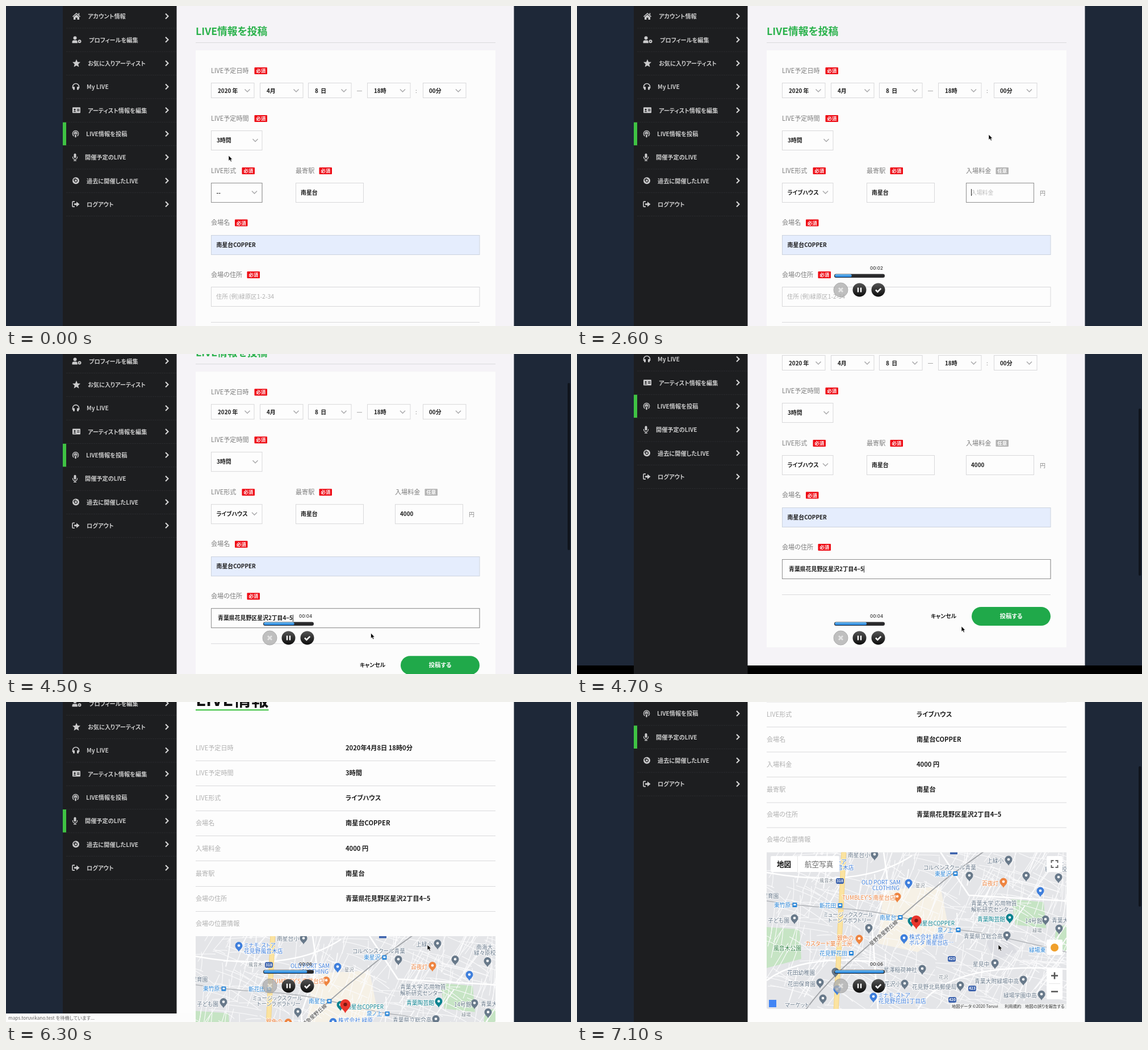
These frames come from a looping animation (995x563 px, 7.2 s). An HTML page:

```html
<!DOCTYPE html>
<html lang="ja">
<head>
<meta charset="utf-8">
<title>LIVE情報を投稿</title>
<style>
html, body { margin: 0; width: 100%; height: 100%; overflow: hidden; background: #1e2838; }
svg { display: block; font-family: "Noto Sans CJK JP", "Noto Sans CJK", sans-serif; font-weight: 500; font-feature-settings: "palt"; }
text { white-space: pre; }
.latin { font-family: Inter, "Noto Sans CJK JP", sans-serif; }
.halo text { paint-order: stroke; stroke: #fff; stroke-width: 2px; stroke-opacity: .8; }
</style>
</head>
<body>
<svg id="stage" width="995" height="563" viewBox="0 0 995 563"></svg>
<script>
const LOOP = 7200, SWITCH = 6200, CHOSEN = 1100, PASTED = 4300;
const VENUE = '南星台COPPER', STATION = '南星台', ADDRESS = '青葉県花見野区星沢2丁目4−5';
const BOLD = 'font-weight="700"', MIDDLE = ' text-anchor="middle"';

// Drawing helpers; text is placed by its vertical centre.
const box = (x, y, w, h, fill, stroke = 'none', r = 0) =>
  `<rect x="${x}" y="${y}" width="${w}" height="${h}" rx="${r}" fill="${fill}" stroke="${stroke}"/>`;
const text = (x, y, s, size = 10, fill = '#222', extra = '') =>
  `<text x="${x}" y="${y + size * .37}" font-size="${size}" fill="${fill}" ${extra}>${s}</text>`;
const line = (d, stroke, w = 1, extra = '') =>
  `<path d="${d}" fill="none" stroke="${stroke}" stroke-width="${w}" ${extra}/>`;
const shape = (d, fill) => `<path d="${d}" fill="${fill}"/>`;
const dot = (x, y, r, fill, stroke = 'none', w = 1) =>
  `<circle cx="${x}" cy="${y}" r="${r}" fill="${fill}" stroke="${stroke}" stroke-width="${w}"/>`;
const at = (x, y, s, extra = '') => `<g transform="translate(${x} ${y}) ${extra}">${s}</g>`;
const during = (from, to, s) => `<g data-from="${from}" data-to="${to}">${s}</g>`;
const rule = (x, y, w, fill = '#dadadc') => box(x, Math.round(y), w, 1, fill);

// Sidebar
const INK = '#cbcbcc', SIDE = '#1d1e20';
const icons = [
  shape('M-7 .3 0-6 7 .3 6 1.4 0-4-6 1.4zM-5 1.6 0-2.8 5 1.6V6H1.5V2.5h-3V6H-5zM3.5-5.5h1.8v3H3.5z', INK),
  dot(-3, -3, 3, INK) + shape('M-8 6V4q0-3 3-3h4q2 0 2 2L1.5 6z', INK) + dot(5, 3, 2, 'none', INK, 2),
  shape('M0-7 2-2.2 7-1.8 3.2 1.6 4.4 6.6 0 4-4.4 6.6-3.2 1.6-7-1.8-2-2.2z', INK),
  line('M-5.5 3V0a5.5 5.5 0 0 1 11 0V3', INK, 1.6) + box(-5, 0, 3, 5.5, INK, 'none', 1) + box(2, 0, 3, 5.5, INK, 'none', 1),
  box(-7, -5, 14, 10, INK, 'none', 1) + dot(-3, -1, 1.5, SIDE) + shape('M-5.5 3q2.5-3.5 5 0z', SIDE) + line('M1-1.5h4.5M1 1h4.5', SIDE, 1.2),
  line('M-3 4.2a5.2 5.2 0 1 1 6 0M-2 1.5a2.6 2.6 0 1 1 4 0', INK, 1.3) + dot(0, -.5, 1.3, INK) + box(-1.2, 1.5, 2.4, 5, INK, 'none', 1),
  box(-2, -6.5, 4, 8, INK, 'none', 2) + line('M-4-1v1a4 4 0 0 0 8 0v-1M0 4v2.5M-2.5 6.2h5', INK, 1.2),
  dot(0, 0, 6, INK) + dot(0, 0, 2.5, 'none', SIDE, 1.2) + line('M-4 0a4 4 0 0 1 4-4', SIDE),
  line('M-2-4.5h-3q-1 0-1 1v7q0 1 1 1h3', INK, 1.6) + shape('M-3-1.5H1v-3L6.5 0 1 4.5v-3h-4z', INK)
];
const items = [['アカウント情報', 124, 144], ['プロフィールを編集', 124.5, 146], ['お気に入りアーティスト', 124, 144],
  ['My LIVE', 123, 142], ['アーティスト情報を編集', 124, 144], ['LIVE情報を投稿', 122.5, 141],
  ['開催予定のLIVE', 121.5, 139], ['過去に開催したLIVE', 123, 142], ['ログアウト', 123, 142]];
const rowY = i => 18.5 + i * 41.33;
const active = i => box(100, rowY(i) - 20.5, 6, 40.5, '#3fc343');
const sidebar = box(100, -60, 200.5, 1400, SIDE) + items.map(([name, ix, tx], i) =>
  at(ix, rowY(i) - .5, icons[i]) + text(tx, rowY(i), name, 10.2, '#c9c9c9', BOLD) +
  line(`M281 ${rowY(i) - 5}l4.5 4.5-4.5 4.5`, '#d6d6d6', 2.1) +
  line(`M106 ${rowY(i) + 20.5}H300`, '#292a2d', 1, 'stroke-dasharray="3 1"')).join('') +
  during(0, SWITCH, active(5)) + during(SWITCH, LOOP, active(6));

// Form page
const badge = (x, y, optional) => box(x, y - 6, 22.5, 12, optional ? '#b3b3b3' : '#ee0a14', 'none', 1) +
  text(x + 11.2, y, optional ? '任意' : '必須', 8.5, '#fff', BOLD + MIDDLE);
const label = (x, y, s, bx, optional) => text(x, y, s, 11.1, '#7d7d7d') + badge(bx, y + .5, optional);
const field = (x, y, w, h = 34, fill = '#fdfdfd', stroke = '#d8d8da') => box(x + .5, y + .5, w - 1, h, fill, stroke);
const focus = (from, to, x, y, w) => during(from, to, field(x, y, w, 34, 'none', '#8f8f8f'));
const arrow = (x, y) => line(`M${x - 4.5} ${y - 2.5}l4.5 4.5 4.5-4.5`, '#a9a9ab', 1.5);
const value = (x, y, s, extra = '') => text(x, y, s, 9.9, '#1c1c1c', BOLD + extra);
const select = (x, tx, s, ax) => field(x, 135, 76.5, 26) + value(tx, 149, s) + arrow(ax, 149);
const submit = fill => box(695, 578, 139, 33, fill, 'none', 16.5);

const form = box(300, -60, 594.5, 741, '#f5f3f7') + box(334, 78, 528, 571, '#fcfcfc') +
  text(334, 44, 'LIVE情報を投稿', 17.8, '#2bb24c', BOLD) + rule(334, 64, 528) +
  label(361, 113.5, 'LIVE予定日時', 437.5) +
  select(361, 373, '2020 年', 425) + select(447, 459, '4月', 511) + select(532, 544, '8  日', 595) +
  rule(618, 149, 9, '#aaa') + select(636, 648, '18時', 698.5) + text(721, 149, ':', 10, '#888') + select(734, 745, '00分', 796.5) +
  label(361, 197.5, 'LIVE予定時間', 437.5) + field(361, 219, 90.5) + value(371, 236.5, '3時間') + arrow(439, 236.5) +
  label(361, 289.5, 'LIVE形式', 415.5) + field(361, 311, 90.5) + arrow(437.5, 328) + focus(0, 2000, 361, 311, 90.5) +
  during(0, CHOSEN, value(370.5, 328, '--')) + during(CHOSEN, LOOP, value(370.5, 328, 'ライブハウス')) +
  label(510, 289.5, '最寄駅', 551.5) + field(510, 311, 120) + value(519, 328, STATION) +
  during(CHOSEN, LOOP, label(685, 289.5, '入場料金', 737.5, true) + field(685, 311, 120) + text(815, 329, '円', 10, '#888') +
    during(0, 2800, text(694, 328, '入場料金', 9.8, '#bdbdbd'))) +
  focus(2000, 3700, 685, 311, 120) + value(694, 328, '', ' id="fee"') +
  label(361, 381, '会場名', 403) + field(361, 403, 473.5, 34, '#e5edfd', '#ccd3df') + value(370.5, 420, VENUE) +
  label(361, 472.5, '会場の住所', 424.5) + field(361, 494, 473.5) + focus(3700, 5300, 361, 494, 473.5) +
  during(0, PASTED, text(370, 511.5, '住所 (例)緑原区1-2-34', 10.4, '#b0b0b0')) + value(373, 511.5, '', ' id="address"') +
  `<rect id="caret" width="1" height="12" fill="#222"/>` +
  rule(361, 556, 473) + text(645.5, 594.5, 'キャンセル', 9.8, '#1c1c1c', BOLD + MIDDLE) +
  during(0, 5300, submit('#20a94a')) + during(5300, SWITCH, submit('#1cb84e')) +
  text(764.5, 594, '投稿する', 10.5, '#fff', BOLD + MIDDLE) +
  during(3800, PASTED, box(361.5, 380.5, 133, 114, '#fff', '#dcdcde', 2) + box(362, 466, 132, 28, '#f4f6f8') + rule(362, 465, 132) +
    ['Tmoro', '桜見台6-27-43', '385 Walnut Kite Lane'].map((s, i) => text(370, 398 + i * 25, s, 9, '#222', 'class="latin"')).join('') +
    text(370, 480, '住所を管理...', 9, '#333')) +
  box(0, 681, 995, 600, '#000');

// Map
const BLUE = '#3f7fdc', GREY = '#68798a', ORANGE = '#ee8440', TEAL = '#0b828f', RAIL = '#2a86d8';
let seed = 7;
const rnd = () => (seed = seed * 16807 % 2147483647) / 2147483647;
const streets = Array.from({ length: 480 }, (_, i) => {
  const x = 320 + rnd() * 550, y = 260 + rnd() * 285, len = 20 + rnd() * 70;
  const a = (i % 2 ? .3 : -1.2) + (rnd() - .5) * .7;
  const dx = Math.cos(a) * len, dy = Math.sin(a) * len;
  return line(`M${x.toFixed()} ${y.toFixed()}q${(dx / 2 + 3).toFixed()} ${(dy / 2 - 2).toFixed()} ${dx.toFixed()} ${dy.toFixed()}`,
    '#fbfbfc', i % 12 ? 1.1 : 2);
}).join('');
const drop = (fill, core) => shape('M0 10C-1.5 6-6.5 4-6.5-1a6.5 6.5 0 0 1 13 0C6.5 4 1.5 6 0 10z', fill) + dot(0, -1, 2.3, core);
const pins = (fill, spots) => spots.map(([x, y]) => at(x, y, drop(fill, '#fff'))).join('');
const names = (fill, list, size = 9.8) => list.map(([s, x, y]) => text(x, y, s, size, fill)).join('');
const stations = list => names(RAIL, list) + list.map(([s, x, y]) => {
  const sx = x + s.length * 9.8 + 3;
  return box(sx, y - 4, 8, 8, RAIL, 'none', 1) + box(sx + 2, y - 2, 4, 3, '#fff');
}).join('');
const route = (x, y, n) => box(x - 7, y - 5, 14, 10, '#3d63ad', 'none', 3) + text(x, y, n, 6.5, '#fff', BOLD + MIDDLE);

const map = `<g clip-path="url(#mapClip)">` + box(334, 264, 528, 277, '#e4e5e8') +
  shape('M540 330 640 325 655 400 600 440 530 425z', '#f6f1e6') +
  shape('M765 347 822 352 826 398 772 392zM334 396 392 400 395 452 334 468zM844 396 862 392V440L840 425z', '#c6e4c4') +
  shape('M720 420 760 415 775 440 735 455z', '#dcdde2') + streets +
  line('M334 300Q500 330 590 270M540 264 548 320 520 400 530 541M600 541Q650 455 862 470M640 264 690 340 862 350M334 490Q400 440 540 460', '#fff', 2.6) +
  line('M470 260Q463 400 456 545', '#f3d488', 9) + line('M470 260Q463 400 456 545', '#fbe3a0', 7) +
  line('M718 262 655 307 600 352 538 406 500 440Q440 490 400 545', '#a0a3a7', 1.8) +
  line('M334 350Q400 360 460 363T590 383 690 403 862 440', '#b1b4b8', 1.6) +
  pins(BLUE, [[410, 282], [584, 319], [576, 416], [522, 519], [458, 506], [816, 333]]) +
  pins(ORANGE, [[751, 317], [564, 343], [497, 417]]) + pins(TEAL, [[762, 380], [589, 386]]) +
  pins(GREY, [[524, 269], [691, 306], [760, 278], [791, 306], [848, 309], [383, 381], [514, 398], [736, 460], [786, 489], [757, 411],
    [825, 383], [849, 399], [608, 470], [577, 496], [675, 499], [818, 515], [433, 522], [428, 494], [455, 475]]) +
  `<g class="halo">` +
  names(GREY, [['南星台小', 477, 269], ['コルベンスクール青葉', 610, 291], ['上緑小', 722, 279], ['保育園', 326, 341], ['子ども園', 336, 384],
    ['ミュージックスクール', 434, 374], ['トーンラボラトリー', 442, 384], ['青葉大学 応用物質', 694, 354], ['解析研究センター', 694, 365],
    ['14号館', 789, 385], ['青葉大', 836, 384], ['青葉県立総合高', 681, 412], ['花田幼稚園', 370, 476], ['花田保育園', 371, 496],
    ['星見中', 697, 461], ['青葉大附緑場中高', 700, 491], ['緑場学園中高', 751, 516], ['星澤稲荷神社', 540, 471], ['花沢小', 541, 496],
    ['花見野北島郵便局', 590, 501], ['南海大', 828, 284], ['緑々原校', 824, 294], ['マーケット', 366, 533]]) +
  names('#7d8790', [['風音木', 427, 314], ['星沢', 596, 323], ['緑場', 802, 402], ['花沢', 637, 484]], 8.3) +
  names(BLUE, [['OLD PORT SAM', 501, 317], ['CLOTHING', 520, 327], ['株式会社 緑原', 585, 413], ['ボルタ 南星台店…', 585, 423],
    ['ミナモ-ストア', 531, 516], ['花見野花田1丁目店', 531, 526], ['ミナモ-ストア', 419, 281], ['花見野風音木店', 419, 291]]) +
  names(ORANGE, [['百夜灯', 713, 319], ["TUMBLEY'S 南星台店", 467, 344], ['銀色の', 458, 415], ['カスタード菓子工房', 402, 425]]) +
  names(TEAL, [['青葉陶芸館', 705, 382], [VENUE, 598, 389]]) + names('#318245', [['風音木公園', 346, 433]]) +
  stations([['東星沢', 630, 302], ['新花田', 427, 358], ['東竹原', 347, 357], ['南星台', 533, 379], ['泉ノ上', 635, 401], ['花見野花田', 427, 442], ['緑場東', 796, 436]]) +
  at(516, 427, text(0, 0, '星野急星野丘線', 9, '#444'), 'rotate(-41)') + '</g>' +
  route(463, 315, 318) + route(660, 452, 420) + route(696, 504, 423) + route(661, 524, 420) + box(657, 264, 13, 4, '#3d63ad') +
  at(597.5, 386, drop('#e8352c', '#7b1712'), 'scale(1.4)') +
  during(6700, LOOP,
    box(341, 271, 121, 28, '#fff', 'none', 2) + box(388, 271, 1, 28, '#e8e8e8') +
    text(352, 285, '地図', 12.6, '#111', BOLD) + text(401, 285, '航空写真', 12.6, '#666') +
    box(827, 271, 28, 28, '#fff', 'none', 2) + line('M835.5 283v-4h4M842.5 279h4v4M846.5 287v4h-4M839.5 291h-4v-4', '#666', 2) +
    box(827, 418, 28, 27, '#fff', 'none', 2) + dot(841, 432, 7, '#f0a02c') +
    box(827, 468, 28, 55, '#fff', 'none', 2) + rule(831, 495, 20, '#e6e6e6') + line('M835 481.5h12M841 475.5v12M835 509.5h12', '#555', 2.6) +
    box(657, 531, 205, 10, '#f5f5f5cc') + text(660, 535.5, '地図データ ©2020 Toruvi', 7.3, '#333') +
    text(753, 535.5, '利用規約', 7.3, '#333') + text(789, 535.5, '地図の誤りを報告する', 7.3, '#333') + box(338, 524, 13, 13, '#4285f4')) + '</g>';

// Detail page
const rows = [['LIVE予定日時', '2020年4月8日 18時0分'], ['LIVE予定時間', '3時間'], ['LIVE形式', 'ライブハウス'], ['会場名', VENUE],
  ['入場料金', '4000 円'], ['最寄駅', STATION], ['会場の住所', ADDRESS], ['会場の位置情報', '']];
const detail = box(300, -60, 594.5, 1400, '#fdfdfd') + text(334, 53, 'LIVE情報', 31, '#111', BOLD) + box(334, 70, 128.5, 2, '#3fc343') +
  rows.map(([name, val], i) => text(334, 138 + i * 44.1, name, 11.1, '#b0b0b0') + text(598, 138 + i * 44.1, val, 11.2, '#1c1c1c', BOLD) +
    (i < 7 ? rule(334, 160 + i * 44.1, 528) : '')).join('') + at(0, 204.5, map);

// Overlays
const status = (from, to, s) => during(from, to, box(-3, 548, 333.5, 18, '#fcfcfc', 'none', 3) + text(4, 555.5, s, 8.3, '#666'));
const recorder = during(300, LOOP,
  `<text id="clock" class="latin" x="516" y="464" font-size="8" fill="#333"></text>` +
  box(453, 471.5, 89, 6.5, '#2a2a2c', 'none', 3.2) + `<rect id="progress" x="454" y="472" height="5" rx="2.5" fill="url(#blue)"/>` +
  `<g opacity=".8">${dot(464.5, 499.5, 12.5, '#b0b0b0', '#989898') + line('M461 496l7 7m0-7l-7 7', '#dedede', 2.8)}</g>` +
  dot(497.5, 499.5, 12, 'url(#black)') + line('M495 495.5v8M500 495.5v8', '#fff', 2.4) +
  dot(530.5, 499.5, 12, 'url(#black)') + line('M526 499.5l3.3 3.3 6-6', '#fff', 2.6));
const gradient = (id, a, b) => `<linearGradient id="${id}" x2="0" y2="1"><stop stop-color="${a}"/><stop offset="1" stop-color="${b}"/></linearGradient>`;

const $ = id => document.getElementById(id);
$('stage').innerHTML = '<defs>' + gradient('blue', '#6fc0f8', '#1c78d2') + gradient('black', '#555', '#0c0c0c') +
  `<path id="tip" d="M0 0V9.5L2.2 7.5 3.8 11 5.5 10.3 4 7H6.8z" fill="#000" stroke="#fff" stroke-width=".7"/>` +
  `<clipPath id="mapClip">${box(334, 264.5, 528, 275.5, '#000')}</clipPath></defs>` + box(0, 0, 995, 563, '#1e2838') +
  `<g id="page">${during(0, SWITCH, form) + during(SWITCH, LOOP, detail) + sidebar}</g>` +
  status(5500, SWITCH, 'リクエストを処理しています...') + status(SWITCH, 6900, 'maps.toruvikano.test を待機しています...') +
  `<rect id="thumb" x="989" width="4.5" rx="2" fill="#000" fill-opacity=".5"/>` + recorder +
  `<g id="pointer">${during(0, 3700, '<use href="#tip"/>') + during(PASTED, LOOP, '<use href="#tip"/>') +
    during(3700, PASTED, line('M-2.5-5q2.5 0 2.5 1.5V4q0 1.5-2.5 1.5M2.5-5q-2.5 0-2.5 1.5V4q0 1.5 2.5 1.5', '#222', 1.2))}</g>`;

const timed = [...document.querySelectorAll('[data-from]')];
const ease = (t, from, to) => {
  const x = Math.min(1, Math.max(0, (t - from) / (to - from)));
  return x * x * (3 - 2 * x);
};
const moves = [[0, 392, 263], [200, 392, 263], [600, 402, 325], [1300, 402, 325], [1900, 738, 325], [2200, 738, 325], [2600, 725, 226],
  [3300, 725, 226], [3900, 608, 503], [4300, 608, 503], [4700, 677, 479], [4900, 677, 479], [5200, 750, 458], [5500, 750, 458], [5900, 742, 427], [LOOP, 742, 427]];

function pointerAt(t) {
  const i = moves.findIndex(m => m[0] > t), [t0, x0, y0] = moves[i - 1], [t1, x1, y1] = moves[i];
  const k = ease(t, t0, t1);
  return [x0 + (x1 - x0) * k, y0 + (y1 - y0) * k];
}

function render(t) {
  for (const g of timed) g.style.display = t >= g.dataset.from && t < g.dataset.to ? '' : 'none';
  const first = t < SWITCH;
  const scroll = first ? 133 * ease(t, 4380, 4680) : 57 + 147.5 * ease(t, 6620, 7020);
  $('page').setAttribute('transform', `translate(0 ${-scroll})`);
  $('pointer').setAttribute('transform', `translate(${pointerAt(t)})`);

  const thumb = $('thumb');
  thumb.style.display = t > 4380 && t < 5200 || t > 6620 ? '' : 'none';
  thumb.setAttribute('y', first ? 96 - (133 - scroll) * .522 : 113 - (204.5 - scroll) * .439);
  thumb.setAttribute('height', first ? 294 : 247);

  $('fee').textContent = '4000'.slice(0, Math.max(0, Math.floor((t - 2650) / 150)));
  $('address').textContent = t < PASTED ? '' : ADDRESS;
  const caret = $('caret'), input = t < 3700 ? $('fee') : $('address');
  caret.style.display = t >= 2000 && t < 5300 ? '' : 'none';
  const width = input.textContent && first ? input.getComputedTextLength() : 0;
  caret.setAttribute('x', t < 3700 ? 694 + width : t < PASTED ? 370 : 373 + width);
  caret.setAttribute('y', t < 3700 ? 322 : 505.5);

  const elapsed = Math.max(0, t / 1000 - .24);
  $('clock').textContent = '00:0' + Math.floor(elapsed);
  $('progress').setAttribute('width', elapsed * 12.6);
}

// The picture advances in steps of a tenth of a second.
function tick(now) {
  render(Math.floor(now % LOOP / 100) * 100);
  requestAnimationFrame(tick);
}
render(0);
requestAnimationFrame(tick);
</script>
</body>
</html>
```
